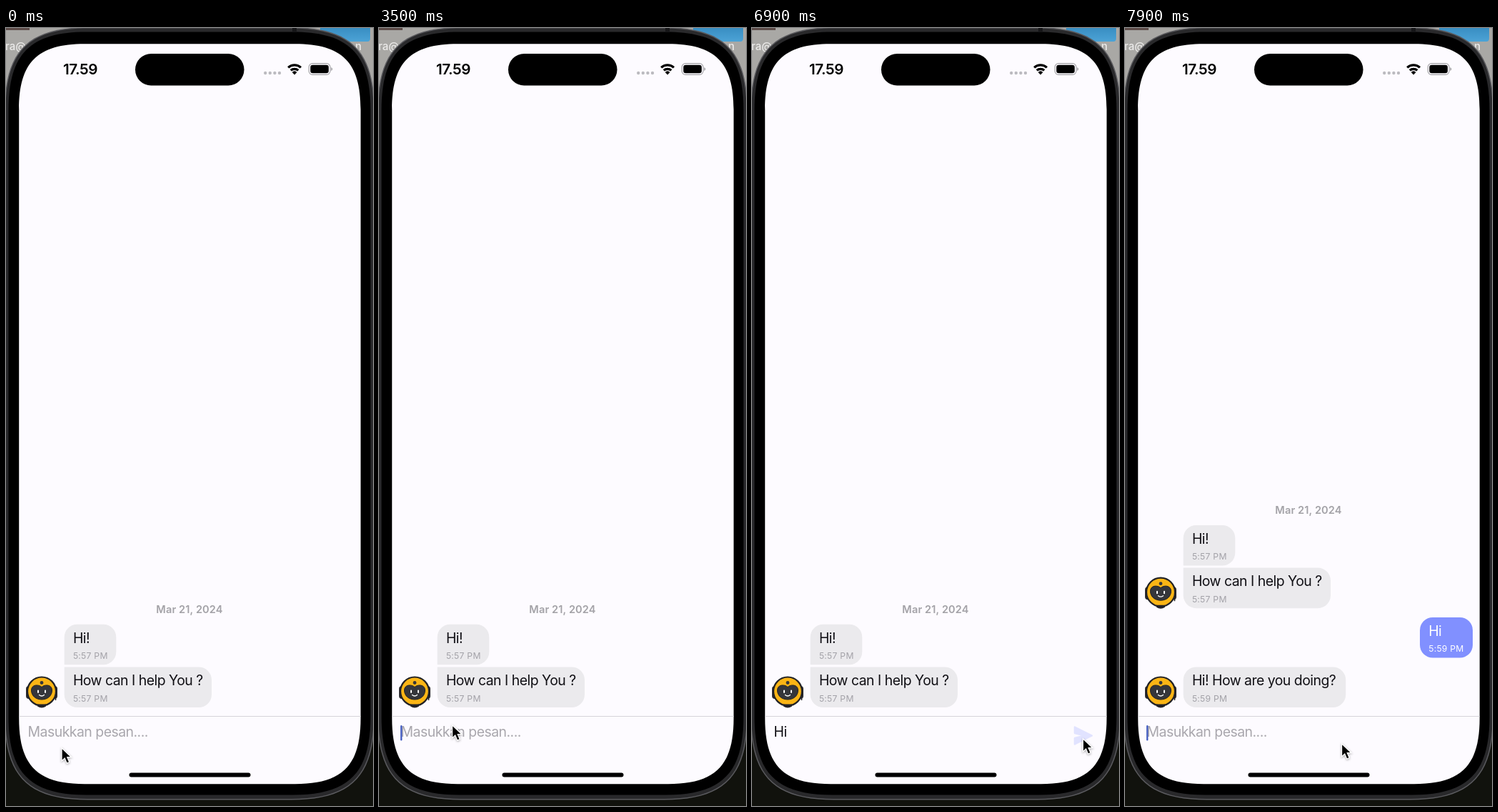
Animation of 514x1089 px, one loop 8000 ms. Source, as an HTML page:

```html
<!DOCTYPE html>
<html lang="id">
<head>
<meta charset="utf-8">
<title>Chat</title>
<style>
  html, body { margin: 0; width: 100%; height: 100%; overflow: hidden; background: #11120d; }
  svg { display: block; font-family: Inter, Roboto, sans-serif; }
  .msg { font-size: 19.46px; letter-spacing: -.52px; fill: #111015; }
  .time { font-size: 12.16px; letter-spacing: .25px; fill: #a3a2a8; }
  .mine { fill: #fff; }
  .date { font-size: 14.6px; font-weight: 600; letter-spacing: .12px; fill: #a3a2a7; text-anchor: middle; }
  .clock { font-size: 20.7px; font-weight: 600; letter-spacing: -.5px; }
  .desk { font-size: 15px; font-weight: 500; fill: #ecebea; }
</style>
</head>
<body>
<svg width="514" height="1089" viewBox="0 0 514 1089">
  <defs>
    <linearGradient id="sky" x2="0" y2="1">
      <stop stop-color="#2f83b8"/><stop offset="1" stop-color="#4ca3d6"/>
    </linearGradient>
    <g id="bot">
      <rect x="28" y="921" width="8" height="18" rx="4" fill="#2b2b30"/>
      <rect x="64" y="921" width="8" height="18" rx="4" fill="#2b2b30"/>
      <path d="M69.5 936v5" stroke="#222226" stroke-width="1.5"/>
      <circle cx="50" cy="928.5" r="20" fill="#fbb515" stroke="#222226" stroke-width="2.2"/>
      <path d="M50 922.5c4-4 14.5-4 14.5 4.5 0 8-6.5 13-14.5 13s-14.5-5-14.5-13c0-8.500 10.500-8.500 14.500-4.500z" fill="#35363b" stroke="#222226"/>
      <circle cx="50" cy="916.5" r="2.4" fill="#35363b"/>
      <path d="M45 927.500v2.500M55 927.500v2.500" stroke="#fff" stroke-width="2" stroke-linecap="round"/>
      <path d="M46.500 933.500q3.500 3 7 0" fill="none" stroke="#fff" stroke-width="1.300" stroke-linecap="round"/>
      <path d="M44 946.500h12v3q-6 4-12 0z" fill="#222226"/>
    </g>
  </defs>

  <!-- desktop behind the phone -->
  <rect width="514" height="120" fill="#a9a8a5"/>
  <path d="M0 0h33v3H0z" fill="#5e4d4a"/>
  <rect x="440" y="-10" width="70" height="29" rx="4" fill="url(#sky)"/>
  <text class="desk" x="-1" y="31">ra@</text>
  <text class="desk" x="489" y="31">n</text>

  <!-- phone -->
  <path id="rim" fill="#5b5b5f"/>
  <path id="frame" fill="#29292b"/>
  <path id="bezel"/>
  <path d="M401 0h6v6h-6z" fill="#161618"/>
  <path id="screen" fill="#fdfbff"/>
  <rect x="181" y="36" width="152.5" height="44.5" rx="22.2"/>
  <rect x="172.5" y="1042.5" width="170" height="6" rx="3"/>

  <!-- status bar -->
  <text class="clock" x="80" y="65">17.59</text>
  <path d="M363.2 63h22" stroke="#bcbbc0" stroke-width="4.4" stroke-linecap="round" stroke-dasharray="0 6.6"/>
  <path d="M395.2 55.4a13 13 0 0 1 17.8 0M398.8 59.3a8 8 0 0 1 10.6 0" fill="none" stroke="#000" stroke-width="3.2"/>
  <path d="M404.1 65.5l-3.4-3.6a5 5 0 0 1 6.8 0z"/>
  <rect x="424.2" y="49.7" width="29.8" height="15.6" rx="5" fill="none" stroke="#a5a4a8" stroke-width="1.2"/>
  <rect x="426.3" y="51.8" width="25.6" height="11.4" rx="3.2"/>
  <path d="M455.3 55q2 .8 2 2.5t-2 2.5z" fill="#a5a4a8"/>

  <g id="list"></g>

  <!-- input bar -->
  <path d="M18 963.5h479" stroke="#d6d4d9"/>
  <text id="input" class="msg" x="30.5" y="991.7"></text>
  <rect id="caret" y="976" width="2.4" height="21.5" rx="1.2" fill="#4a62c4"/>
  <path id="send" d="M452 978.5l24 12-24 12v-8.5l14-3.5-14-3.5z" fill="#8190ff" stroke="#8190ff" stroke-width="2.4" stroke-linejoin="round"/>

  <path id="pointer" d="M0 -.7v18.2l4.2-4 3 7.2 3.6-1.5-3-7h5.8z" stroke="#fff" stroke-width="1.3" style="filter:drop-shadow(0 1.5px 1.5px #0005)"/>
</svg>
<script>
const $ = id => document.getElementById(id);
const LOOP = 8000, ROW = 69.4;
const FOCUS = 3200, TYPE_H = 4600, TYPE_I = 4950, PRESS = 6800, RELEASE = 7050, SENT = 7300, REPLY = 7850;

// Rectangle with continuous corners that begin at distance e from each corner.
function squircle(id, x, y, w, h, e) {
  const k = .72 * e, s = e - k;
  $(id).setAttribute("d", `M${x + e} ${y}h${w - 2 * e}c${k} 0 ${e} ${s} ${e} ${e}v${h - 2 * e}c0 ${k} ${-s} ${e} ${-e} ${e}
    h${2 * e - w}c${-k} 0 ${-e} ${-s} ${-e} ${-e}v${2 * e - h}c0 ${-k} ${s} ${-e} ${e} ${-e}z`);
}
squircle("rim", -2, -1, 518, 1081.5, 117);
squircle("frame", -.5, .5, 515, 1078.5, 115);
squircle("bezel", 3.5, 5.5, 507, 1068, 109);
squircle("screen", 18.2, 22.2, 478.5, 1036, 92);

// Radii run clockwise from the top left corner.
function bubble(x, y, w, text, time, mine, [a, b, c, d] = [18, 18, 18, 18]) {
  const h = 56.6, cls = mine ? " mine" : "", tx = x + 12.2;
  const arc = (r, dx, dy) => `a${r} ${r} 0 0 1 ${dx * r} ${dy * r}`;
  return `<path fill="${mine ? "#8190ff" : "#ebeaed"}" d="M${x + a} ${y}H${x + w - b}${arc(b, 1, 1)}V${y + h - c}${arc(c, -1, 1)}H${x + d}${arc(d, -1, -1)}V${y + a}${arc(a, 1, -1)}z"/>
    <text class="msg${cls}" x="${tx}" y="${y + 25.8}">${text}</text>
    <text class="time${cls}" x="${tx}" y="${y + 48.2}">${time}</text>`;
}

const group = (id, html) => `<g id="${id}">${html}</g>`;
$("list").innerHTML =
  group("greeting", `<text class="date" x="257" y="819.2">Mar 21, 2024</text>` +
    bubble(81.7, 834.7, 72.6, "Hi!", "5:57 PM", false, [18, 18, 18, 0]) +
    bubble(81.7, 894.4, 206.3, "How can I help You ?", "5:57 PM", false, [0, 18, 18, 18]) +
    `<use href="#bot"/>`) +
  group("mine", bubble(413, 894.4, 74, "Hi", "5:59 PM", true)) +
  group("reply", bubble(81.7, 894.4, 227.5, "Hi! How are you doing?", "5:59 PM", false) + `<use href="#bot"/>`);

// Pointer stops: time, x, y
const stops = [
  [0, 78, 1008.5], [900, 78, 1008.5], [1900, 93, 984], [2200, 93, 984], [2800, 102.5, 976.5],
  [6100, 102.5, 976.5], [6750, 463.5, 995.5], [7250, 463.5, 995.5], [7700, 303.5, 1002.5], [LOOP, 303.5, 1002.5]
];

function pointerAt(t) {
  const i = stops.findIndex(s => s[0] > t);
  const [t0, x0, y0] = stops[i - 1], [t1, x1, y1] = stops[i];
  const k = (t - t0) / (t1 - t0), e = k * k * (3 - 2 * k);
  return [x0 + (x1 - x0) * e, y0 + (y1 - y0) * e];
}

const show = (id, on) => $(id).style.visibility = on ? "visible" : "hidden";

function draw(t) {
  const typed = t < TYPE_H || t >= SENT ? "" : t < TYPE_I ? "H" : "Hi";
  const rows = (t >= SENT) + (t >= REPLY);
  const input = $("input");
  input.textContent = typed || "Masukkan pesan....";
  input.style.fill = typed ? "" : "#a9a7ad";

  const lastKey = [SENT, TYPE_I, TYPE_H, FOCUS].find(k => t >= k);
  show("caret", lastKey === SENT || (t - lastKey) % 1000 < 500);
  $("caret").setAttribute("x", [30, 44, 48][typed.length]);

  show("send", typed);
  $("send").style.opacity = t >= PRESS && t < RELEASE ? .22 : 1;

  $("greeting").setAttribute("transform", `translate(0 ${-ROW * rows})`);
  $("mine").setAttribute("transform", `translate(0 ${rows > 1 ? -ROW : 0})`);
  show("mine", rows > 0);
  show("reply", rows > 1);
  $("pointer").setAttribute("transform", `translate(${pointerAt(t)})`);
}

function tick() {
  draw(performance.now() % LOOP);
  requestAnimationFrame(tick);
}
tick();
</script>
</body>
</html>
```
